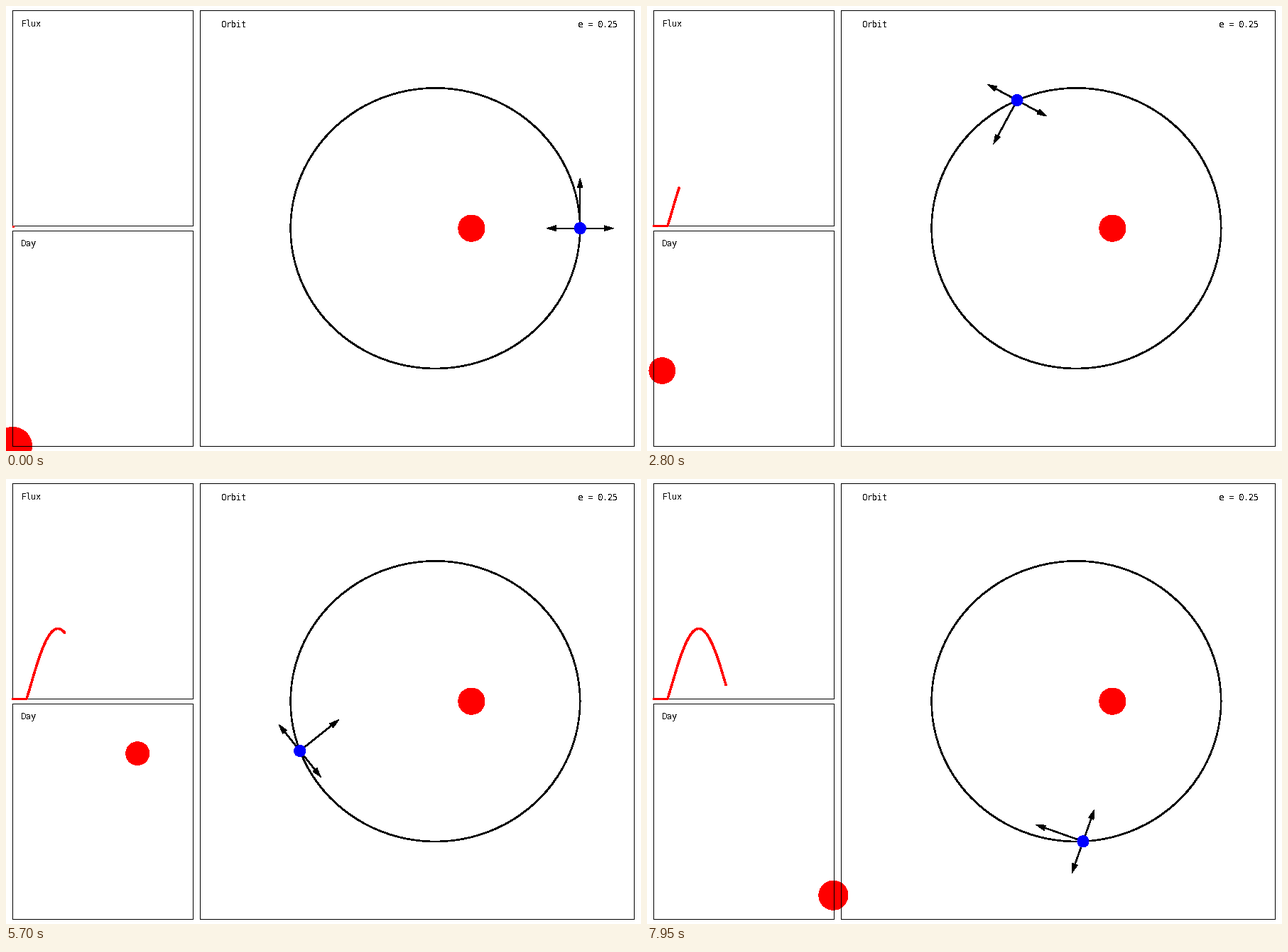
A matplotlib script for the animation above (8 s loop, 894x626 px).

```python
import numpy as np
import matplotlib.pyplot as plt
from matplotlib.animation import FuncAnimation
from matplotlib.patches import Circle, Polygon

# whole-pixel hinting keeps the lettering one pixel thin
plt.rcParams["text.hinting"] = "force_autohint"
plt.rcParams["text.hinting_factor"] = 1

W, H, DPI = 894, 626, 100
FRAMES, STEP_MS = 160, 50
PX = 72 / DPI                      # one pixel in points

ECC = 0.25
A = 203.8                          # semi-major axis
B = A * np.sqrt(1 - ECC ** 2)
CX, CY = 604.4, 312.7              # centre of the ellipse
STAR = np.array([CX + ECC * A, CY])
RATE = np.radians(1.805)           # mean anomaly per frame
SPIN = 1.5                         # 3:2 spin-orbit resonance

LEFT, RIGHT = 9.5, 263.5
FLUX_BASE, DAY_BASE = 309.6, 619.3
FLUX_SCALE, DAY_HEIGHT = 154.7, 252.5
SUN_SIZE = 20.2

# Kepler's equation for every frame
mean = RATE * np.arange(FRAMES)
anom = mean.copy()
for _ in range(12):
    anom -= (anom - ECC * np.sin(anom) - mean) / (1 - ECC * np.cos(anom))

px = CX + A * np.cos(anom)
py = CY - B * np.sin(anom)
dist = 1 - ECC * np.cos(anom)
zenith = np.pi / 2 + SPIN * mean   # direction of the long arrow
hour = zenith - np.arctan2(py - STAR[1], STAR[0] - px)

flux_x = LEFT + (RIGHT - LEFT) * mean / (4 * np.pi)
flux_y = FLUX_BASE - FLUX_SCALE * np.maximum(np.cos(hour), 0) / dist ** 2
sun_x = (LEFT + RIGHT) / 2 + (RIGHT - LEFT) / 2 * np.sin(hour)
sun_y = DAY_BASE - DAY_HEIGHT * np.cos(hour)

fig = plt.figure(figsize=(W / DPI, H / DPI), dpi=DPI, facecolor="white")
ax = fig.add_axes([0, 0, 1, 1])
ax.set_xlim(0, W)
ax.set_ylim(H, 0)
ax.axis("off")


def disc(x, y, r, color, z):
    return ax.add_patch(Circle((x, y), r, fc=color, ec="none", lw=0, aa=False, zorder=z))


def panel(x0, y0, x1, y1):
    """Frame one pixel wide, given by its corner pixels."""
    bars = [(x0, y0, x1, y0), (x0, y1, x1, y1), (x0, y0, x0, y1), (x1, y0, x1, y1)]
    for a, b, c, d in bars:
        box = [(a, b), (c + 1, b), (c + 1, d + 1), (a, d + 1)]
        ax.add_patch(Polygon(box, fc="black", ec="none", lw=0, aa=False,
                             snap=False, zorder=3))


def label(x, y, text):
    ax.text(x, y, text, family="DejaVu Sans Mono", size=12 * PX, color="black",
            va="baseline", antialiased=False, zorder=4)


class Arrow:
    HEAD, HALF = 13, 3.8

    def __init__(self, length, turn):
        self.length, self.turn = length, turn
        self.shaft, = ax.plot([], [], color="black", lw=1.4 * PX, aa=False,
                              snap=False, zorder=5)
        self.head = ax.add_patch(Polygon([(0, 0)] * 3, fc="black", ec="none",
                                         lw=0, aa=False, zorder=5))

    def point(self, x, y, angle):
        angle += self.turn
        way = np.array([np.cos(angle), -np.sin(angle)])
        side = np.array([-way[1], way[0]]) * self.HALF
        tip = np.array([x, y]) + way * self.length
        neck = tip - way * self.HEAD
        self.shaft.set_data([x, neck[0]], [y, neck[1]])
        self.head.set_xy([tip, neck + side, neck - side])


panel(9, 6, 263, 309)
panel(9, 316, 263, 619)
panel(273, 6, 884, 619)
label(21, 29, "Flux")
label(21, 338, "Day")
label(303, 30, "Orbit")
label(805, 30, "e = 0.25")

ring = np.linspace(0, 2 * np.pi, 101)
ax.plot(CX + A * np.cos(ring), CY - B * np.sin(ring), color="black",
        lw=1.6 * PX, aa=False, snap=False, zorder=4)
disc(*STAR, 18.5, "red", 4)

sun = disc(0, 0, 1, "red", 2)
planet = disc(0, 0, 8, "blue", 6)
arrows = [Arrow(70, 0), Arrow(47, np.pi / 2), Arrow(47, -np.pi / 2)]
curve, = ax.plot([], [], color="red", lw=2.4 * PX, aa=False, snap=False, zorder=5,
                 solid_capstyle="projecting", solid_joinstyle="round")
dot, = ax.plot([], [], "s", color="red", ms=3 * PX, mew=0, aa=False, zorder=5)


def draw(i):
    planet.center = px[i], py[i]
    for arrow in arrows:
        arrow.point(px[i], py[i], zenith[i])
    sun.center = sun_x[i], sun_y[i]
    sun.set_radius(SUN_SIZE / dist[i])
    curve.set_data(flux_x[:i + 1], flux_y[:i + 1])
    dot.set_data([flux_x[i]], [flux_y[i]])
    return [planet, sun, curve, dot]


anim = FuncAnimation(fig, draw, frames=FRAMES, interval=STEP_MS,
                     init_func=lambda: draw(0), repeat=True, repeat_delay=0)
plt.show()
```
